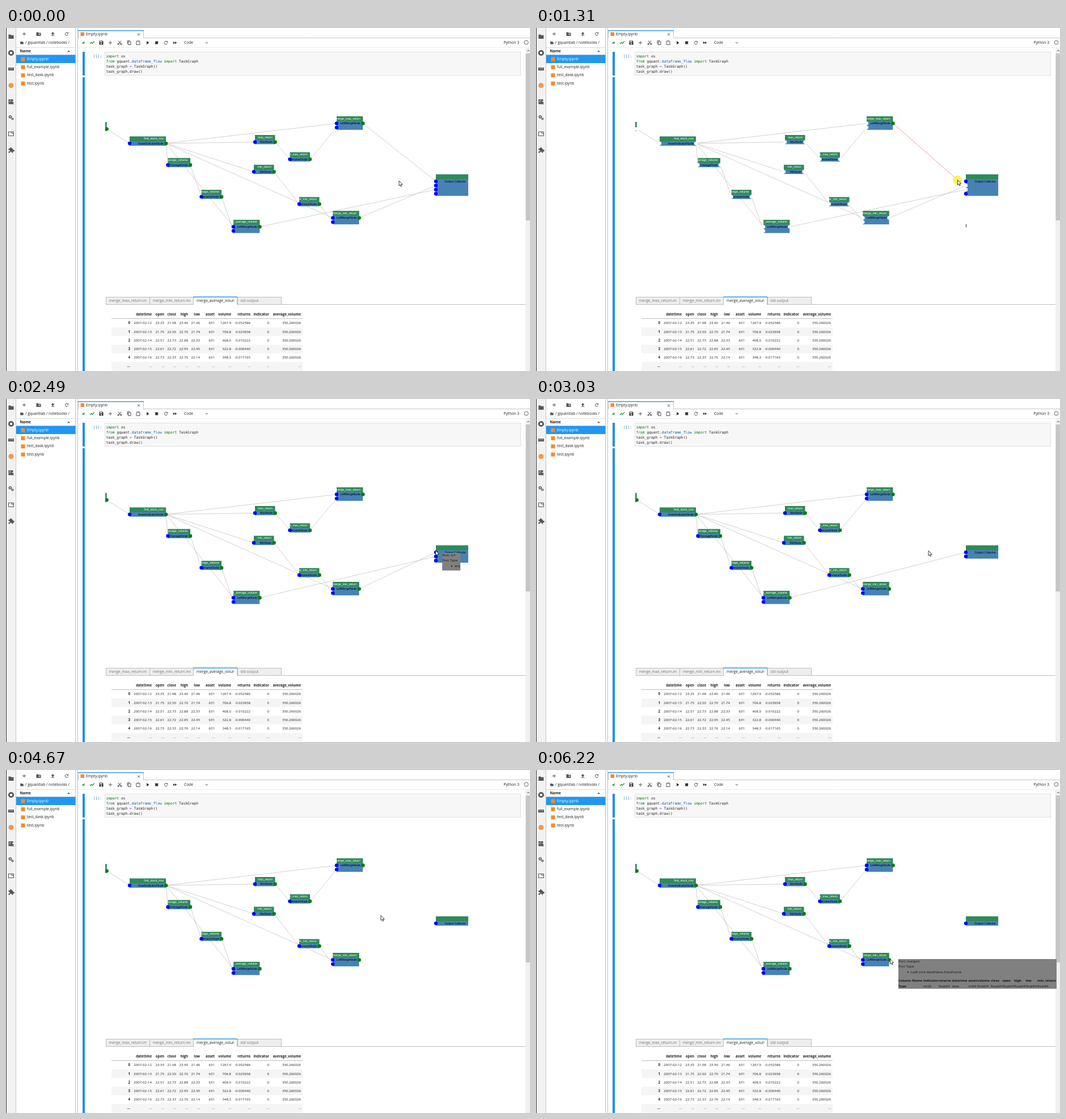
Recreate the animation shown at these times as an HTML page with a canvas. Size 924x606 px, loop 8000 ms.

```html
<!DOCTYPE html>
<html lang="en">
<head>
<meta charset="utf-8">
<title>Task graph editor</title>
<style>
html, body { margin: 0; width: 100%; height: 100%; overflow: hidden; background: #fff; }
canvas { display: block; }
</style>
</head>
<body>
<canvas id="stage" width="924" height="606"></canvas>
<script>
const ctx = document.getElementById("stage").getContext("2d");
const LOOP = 8000;
const UI = '"Open Sans", "Noto Sans", sans-serif';
const ARIAL = '"Liberation Sans", Arial, sans-serif';
const MONO = '"DejaVu Sans Mono", monospace';
const BLUE = "#1e8fe8", DARK = "#555", INK = "#222", ORANGE = "#f58a2c";

// ---------- drawing helpers ----------
function box(x, y, w, h, fill, stroke) {
  if (fill) { ctx.fillStyle = fill; ctx.fillRect(x, y, w, h); }
  if (stroke) { ctx.strokeStyle = stroke; ctx.lineWidth = 1; ctx.strokeRect(x + .5, y + .5, w - 1, h - 1); }
}
function text(s, x, y, { size = 6.6, font = UI, color = INK, align = "left", bold = false } = {}) {
  ctx.font = `${bold ? "bold " : ""}${size}px ${font}`;
  ctx.fillStyle = color;
  ctx.textAlign = align;
  ctx.textBaseline = "middle";
  ctx.fillText(s, x, y);
}
function line(x1, y1, x2, y2, color, width = 1) {
  ctx.strokeStyle = color;
  ctx.lineWidth = width;
  ctx.beginPath();
  ctx.moveTo(x1, y1);
  ctx.lineTo(x2, y2);
  ctx.stroke();
}
function disc(x, y, r, fill) {
  ctx.fillStyle = fill;
  ctx.beginPath();
  ctx.arc(x, y, r, 0, 7);
  ctx.fill();
}
function icon(x, y, d, { fill = DARK, stroke, width = 1 } = {}) {
  const path = new Path2D(d);
  ctx.save();
  ctx.translate(x, y);
  if (stroke) { ctx.strokeStyle = stroke; ctx.lineWidth = width; ctx.stroke(path); }
  else { ctx.fillStyle = fill; ctx.fill(path, "evenodd"); }
  ctx.restore();
}
function clipped(x, y, w, h, draw) {
  ctx.save();
  ctx.beginPath();
  ctx.rect(x, y, w, h);
  ctx.clip();
  draw();
  ctx.restore();
}

// ---------- page around the graph ----------
const PLUS = "M-3 0H3M0 -3V3";
const FOLDER = "M-4 -3H-1L0 -2H4V3.5H-4Z";
const REFRESH = "M2.2 -1.6A2.7 2.7 0 1 0 2.7 .6M2.8 -3V-1H.8";
const outline = { stroke: DARK };

function sidebar() {
  box(0, 0, 18, 606, "#f2f2f2");
  box(0, 0, 1, 606, "#333");
  box(17, 0, 1, 606, "#c4c4c4");
  icon(9, 15, "M-4.5 -3.5H-1L0 -2.3H4.5V4H-4.5Z");
  icon(9, 44, "M-5 0A5 5 0 1 0 5 0A5 5 0 1 0 -5 0ZM-2 -2H2V2H-2Z");
  icon(9, 72.5, "M-5 -2.5H5V2.5H-5ZM-3.5 -1V0H-2V-1ZM-1 -1V0H.5V-1ZM1.5 -1V0H3.5V-1Z");
  disc(9, 101.5, 4.5, "#f29a4a");
  icon(9, 130, "M-4.5 -4H3.5V-1H1V1H3.5V4.5H-4.5ZM-3 -2.5V-1.5H0V-2.5ZM-3 0V1H-1V0Z");
  icon(11, 132, "M-2 0A2 2 0 1 0 2 0A2 2 0 1 0 -2 0M1.4 1.4L3 3", outline);
  icon(7.5, 157, "M-2 0A2 2 0 1 0 2 0A2 2 0 1 0 -2 0", { stroke: DARK, width: 1.6 });
  icon(11.5, 160.5, "M-1.4 0A1.4 1.4 0 1 0 1.4 0A1.4 1.4 0 1 0 -1.4 0", { stroke: DARK, width: 1.3 });
  icon(9, 187, "M-4.5 -3.5H4.5V3.5H-4.5ZM1 -3.5V-1H4.5", outline);
  icon(9, 215.5, "M-4.5 -2.5H-1.8A1.6 1.6 0 1 1 1 -2.5H3.2V0A1.6 1.6 0 1 1 3.2 2.4V5H1A1.5 1.5 0 1 0 -1.8 5H-4.5V2.5A1.5 1.5 0 1 0 -4.5 0Z");
}

function fileBrowser() {
  box(18, 0, 104, 606, "#fff");
  box(122, 0, 5, 606, "#f8f8f8");
  box(122, 0, 1, 606, "#c4c4c4");
  box(126, 0, 1, 606, "#c4c4c4");
  icon(32, 10.5, PLUS, outline);
  icon(57.5, 10.5, FOLDER);
  icon(58.8, 11, "M-1.5 0H1.5M0 -1.5V1.5", { stroke: "#fff", width: .8 });
  icon(82.5, 10.5, "M0 -3.5L3 -.3H1.2V2H-1.2V-.3H-3ZM-3 2.7H3V3.6H-3Z");
  icon(107, 10.5, REFRESH, outline);
  icon(28, 26, "M-2.8 -2.2H-.5L.2 -1.5H2.8V2.4H-2.8Z");
  text("/ gquantlab / notebooks /", 34, 26);
  line(18, 34.5, 122, 34.5, "#dcdcdc");
  line(18, 47.5, 122, 47.5, "#dcdcdc");
  text("Name", 24.5, 41, { bold: true, size: 6.5 });
  icon(110.5, 41, "M-2.5 1.2L0 -1.5L2.5 1.2Z");
  box(18, 47.5, 104.5, 14.5, "#2196f3");
  ["Empty.ipynb", "full_example.ipynb", "test_dask.ipynb", "test.ipynb"].forEach((name, i) => {
    const y = 55 + i * 14.35;
    box(26.5, y - 3.5, 7, 7, ORANGE);
    text(name, 37, y, { color: i ? INK : "#fff" });
  });
}

function toolbar() {
  box(127, 0, 797, 18, "#fff");
  line(127, 17.5, 924, 17.5, "#c4c4c4");
  box(127, 4, 116, 14, "#fff", "#c4c4c4");
  box(128, 17, 114, 1, "#fff");
  box(127, 4, 116, 1.3, BLUE);
  box(131.5, 7.5, 6.5, 6.5, ORANGE);
  text("Empty.ipynb", 141, 11);
  icon(234, 11.5, "M-2 -2L2 2M2 -2L-2 2", outline);

  icon(136, 26, "M-3 .8L3 -2.5L1.5 3L.2 .8L-2 3L-.8 .6Z", { fill: "#2a9a45" });
  icon(152, 26, "M-4 2L-1.5 -.5L.3 1.3L4 -2.5", { stroke: "#2a9a45", width: 1.4 });
  icon(168, 26, "M-3.5 -3.5H2.3L3.5 -2.3V3.5H-3.5ZM-2.4 -2.6V-.8H1.5V-2.6ZM-1.2 1.6A1.2 1.2 0 1 0 1.2 1.6A1.2 1.2 0 1 0 -1.2 1.6Z", { fill: "#333" });
  icon(184, 26, PLUS, outline);
  icon(200.5, 26, "M-2.5 -3.3L2 2M2.5 -3.3L-2 2M-3.4 2.4A1.1 1.1 0 1 0 -1.2 2.4A1.1 1.1 0 1 0 -3.4 2.4M1.2 2.4A1.1 1.1 0 1 0 3.4 2.4A1.1 1.1 0 1 0 1.2 2.4", { stroke: "#333" });
  icon(217, 26, "M-1.5 -2H3V3.5H-1.5ZM-3 2V-3.5H1.5", outline);
  icon(233, 26, "M-3 -2.7H3V3.5H-3ZM-1.3 -3.2H1.3", outline);
  icon(250, 26, "M-2 -3L2.5 0L-2 3Z", { fill: "#333" });
  box(263.2, 23.5, 5, 5, "#333");
  icon(282, 26, REFRESH, outline);
  icon(298, 26, "M-3.2 -2.3L0 0L-3.2 2.3ZM0 -2.3L3.2 0L0 2.3Z", { fill: "#333" });
  text("Code", 314, 26);
  icon(354, 26, "M-2 -1L0 1L2 -1", outline);
  text("Python 3", 905, 26, { align: "right", size: 6.7 });
  icon(917.5, 25.5, "M-3.5 0A3.5 3.5 0 1 0 3.5 0A3.5 3.5 0 1 0 -3.5 0", { stroke: DARK, width: .9 });
  line(127, 34.5, 924, 34.5, "#ececec");
}

function codeCell() {
  box(135, 42, 4, 42, BLUE);
  box(135, 87, 4, 519, BLUE);
  text("[1]:", 154, 50, { font: MONO, size: 6.3, color: "#307fc1" });
  box(174, 42, 734, 42, "#f7f7f7", "#e0e0e0");
  const colors = { import: "#006a00", from: "#006a00", dataframe_flow: "#0055aa", "=": "#8a2be2" };
  const rows = ["import os", "from gquant.dataframe_flow import TaskGraph", "task_graph = TaskGraph()", "task_graph.draw()"];
  rows.forEach((row, i) => {
    for (const { 0: word, index } of row.matchAll(/\w+|[^\w\s]+/g))
      text(word, 176.5 + index * 3.78, 49.9 + i * 9.2, { font: MONO, size: 6.28, color: colors[word] });
  });
}

function resultTable() {
  line(176, 488.5, 917, 488.5, "#bdbdbd");
  ["merge_max_return.merged", "merge_min_return.merged", "merge_average_volume.merged", "std output"].forEach((label, i) => {
    const x = 176 + i * 77.2, active = i === 2;
    box(Math.round(x), 475, 78, 14, active ? "#fff" : "#eeeeee", "#bdbdbd");
    if (active) {
      box(Math.round(x), 474.5, 78, 1.3, BLUE);
      box(Math.round(x) + 1, 488, 76, 1, "#fff");
    }
    clipped(x, 475, 72, 13, () => text(label, x + 5.7, 482, { color: active ? INK : "#777" }));
  });

  const right = [219, 257, 279, 300, 321, 342, 368, 397, 431, 464, 520];
  const rows = [
    " datetime open close high low asset volume returns indicator average_volume",
    "0 2007-02-12 23.35 21.98 23.40 21.46 631 1267.9 -0.052586 0 350.260026",
    "1 2007-02-13 21.75 22.50 22.70 21.74 631 706.8 0.023658 0 350.260026",
    "2 2007-02-14 22.51 22.73 22.88 22.33 631 408.0 0.010222 0 350.260026",
    "3 2007-02-15 22.61 22.72 22.95 22.45 631 322.8 -0.000440 0 350.260026",
    "4 2007-02-16 22.73 22.33 22.76 22.14 631 348.3 -0.017165 0 350.260026",
    Array(11).fill("...").join(" ")
  ];
  rows.forEach((row, r) => {
    const y = 506.3 + r * 15.2;
    if (r && r % 2 === 0) box(186, y - 7.6, 337, 15.2, "#f5f5f5");
    row.split(" ").forEach((cell, c) =>
      text(cell, right[c], y + .3, { size: 6.1, align: "right", bold: !r || !c }));
  });
  line(186, 513.5, 523, 513.5, "#bdbdbd");
}

function scrollbar() {
  box(916, 35, 8, 571, "#f0f0f0");
  box(916.5, 45, 7.5, 295, "#c6c6c6");
  icon(921, 40, "M-2 1.2L0 -1L2 1.2", outline);
}

// ---------- graph ----------
const HEAD = 8, ROW = 7.3, PAD = .6, PORT = 3.2;
const node = (x, y, w, inputs, title, type) => ({ x, y, w, inputs, title, type });
const nodes = {
  load: node(150, 166.5, 27.7, 0, "", ""),
  find: node(218, 192, 64.2, 1, "find_stock_row", "AssetIndicatorNode"),
  avg: node(285.5, 230.2, 39.5, 1, "average_volume", "AverageNode"),
  renAvg: node(344.5, 286.3, 35.6, 1, "rename_average_volume", "RenameNode"),
  avgOut: node(401, 339.3, 46.5, 2, "merge_average_volume", "LeftMergeNode"),
  max: node(439, 189.7, 35.6, 1, "max_return", "MaxNode"),
  renMax: node(500.5, 220, 35.6, 1, "rename_max_return", "RenameNode"),
  maxOut: node(583, 156.7, 46.5, 2, "merge_max_return", "LeftMergeNode"),
  min: node(437, 242.2, 35.6, 1, "min_return", "MinNode"),
  renMin: node(517, 299.2, 35.6, 1, "rename_min_return", "RenameNode"),
  minOut: node(576.3, 323.7, 46.5, 2, "merge_min_return", "LeftMergeNode"),
  collector: node(758, 259, 57.3, 4, "", "Output Collector")
};
const wires = `load find 0,find max 0,find min 0,find avg 0,find maxOut 0,find minOut 0,find avgOut 0,
  avg renAvg 0,renAvg avgOut 1,max renMax 0,renMax maxOut 1,min renMin 0,renMin minOut 1`
  .split(",").map(s => s.trim().split(" "));
const sources = ["maxOut", "minOut", "avgOut"];

const inPort = (n, i) => [n.x, n.y + HEAD + ROW * (i + .5) + .2];
const outPort = n => [n.x + n.w, n.y + HEAD + ROW / 2 + .2];
const wire = (a, b, color = "#bcbcbc", width = .7) => line(...a, ...b, color, width);

function drawNode(n) {
  const top = n.y - PAD, h = HEAD + ROW * Math.max(1, n.inputs) + 2 * PAD;
  clipped(n.x, top, n.w, h, () => {
    box(n.x, top, n.w, h, "#4682b4");
    box(n.x, top, n.w, HEAD + PAD, "#2e8b57");
    const label = { font: ARIAL, size: 5.15, align: "right" };
    text(n.title, n.x + n.w - 4.6, n.y + 3.7, { ...label, color: "#fff" });
    text(n.type, n.x + n.w - 4.6, n.y + 12.2, { ...label, color: "#000" });
  });
}

function drawGraph({ removed, dragging, tip }) {
  const links = sources.slice(removed), { collector } = nodes;
  collector.inputs = links.length + 1;
  clipped(175, 88, 741, 386, () => {
    wires.forEach(([a, b, i]) => wire(outPort(nodes[a]), inPort(nodes[b], +i)));
    links.forEach((name, i) => {
      if (!dragging || i) wire(outPort(nodes[name]), inPort(collector, i));
    });
    if (dragging) wire(outPort(nodes[links[0]]), tip, "#ff6e6e", .7);
    Object.values(nodes).forEach(drawNode);
    for (const [name, n] of Object.entries(nodes)) {
      for (let i = 0; i < n.inputs; i++) {
        const free = n === collector && (i === 0 || i === n.inputs - 1);
        disc(...inPort(n, i), PORT, dragging && !free ? "#fff" : "#0000ff");
      }
      if (n !== collector)
        disc(...outPort(n), PORT, dragging && name !== links[0] ? "#fff" : "#008000");
    }
    if (dragging) line(758.5, 346.5, 758.5, 352, "#333");
  });
}

// ---------- tooltips and pointer ----------
function portTip(x, y) {
  const style = { size: 6.1, color: "#111" };
  box(x, y, 32, 31, "#808080");
  text("Port: in1", x, y + 4.5, style);
  text("Port Type:", x, y + 13.7, style);
  disc(x + 16.7, y + 23.2, 1.1, "#111");
  text("any", x + 21.5, y + 23, style);
}

function frameTip() {
  const style = { size: 6.05, color: "#111" }, bold = { size: 5.9, color: "#111", bold: true };
  box(639, 334, 279, 52.5, "#808080");
  text("Port: merged", 639, 338.7, style);
  text("Port Type:", 639, 347.9, style);
  disc(655.8, 357.2, 1.1, "#111");
  text("cudf.core.dataframe.DataFrame", 660.5, 357, style);
  text("Column Name", 639, 372.3, bold);
  text("Type", 639, 382.3, bold);
  const columns = { indicator: 683, returns: 710, datetime: 733.5, asset: 762.3, volume: 778.3,
    close: 802, open: 822.5, high: 843, low: 863.5, min_return: 884 };
  const types = { indicator: "int32", datetime: "date", asset: "int64" };
  for (const [name, x] of Object.entries(columns)) {
    text(name, x, 372.3, bold);
    text(types[name] || "float64", x, 382.3, style);
  }
}

function pointer([x, y], pressed) {
  if (pressed) disc(x - .5, y + .2, 8, "rgba(255,240,70,.9)");
  const arrow = "M0 0V8.8L2 7L3.4 10.2L4.8 9.6L3.4 6.5H6.2Z";
  icon(x, y, arrow, { fill: "#fff" });
  icon(x, y, arrow, { stroke: "#111", width: .8 });
}

// ---------- timeline ----------
const presses = [1010, 2560, 4100], releases = [1640, 3030, 4600];
const hovers = [[700, 1010], [2300, 2560], [3640, 4100]];
const track = [
  [70, 693, 270], [700, 758, 268], [1010, 758, 268], [1310, 743.5, 268.5], [1640, 706, 276], [1800, 700, 276],
  [2280, 757.5, 267.5], [2560, 757.5, 267.5], [3030, 692, 268], [3350, 692, 268],
  [3620, 758.5, 269.5], [4350, 758.5, 269.5], [4670, 661, 257], [4830, 647, 253],
  [4990, 647, 253], [5760, 632, 329], [5840, 632, 329], [6020, 624.5, 334]
];
const clamp = v => Math.min(1, Math.max(0, v));
const passed = (times, t) => times.filter(v => t >= v).length;

function pointerAt(t) {
  const next = track.findIndex(k => k[0] > t);
  if (next === 0) return track[0].slice(1);
  if (next < 0) return track.at(-1).slice(1);
  const [t0, x0, y0] = track[next - 1], [t1, x1, y1] = track[next];
  const p = (t - t0) / (t1 - t0), e = p * p * (3 - 2 * p);
  return [x0 + (x1 - x0) * e, y0 + (y1 - y0) * e];
}

function faded(alpha, draw) {
  if (alpha <= 0) return;
  ctx.globalAlpha = alpha;
  draw();
  ctx.globalAlpha = 1;
}

function render(t) {
  const tip = pointerAt(t), removed = passed(releases, t);
  const dragging = passed(presses, t) > removed;
  box(0, 0, 924, 606, "#fff");
  sidebar();
  fileBrowser();
  toolbar();
  codeCell();
  resultTable();
  scrollbar();
  drawGraph({ removed, dragging, tip });
  const hover = hovers.find(([from, to]) => t >= from && t < to);
  if (hover) faded(clamp((t - hover[0]) / 140), () => portTip(tip[0] + 11.7, tip[1] + 4.5));
  faded(clamp((t - 6073) / 140), frameTip);
  pointer(tip, dragging);
}

const start = performance.now();
(function tick() {
  render((performance.now() - start) % LOOP);
  requestAnimationFrame(tick);
})();
</script>
</body>
</html>
```
